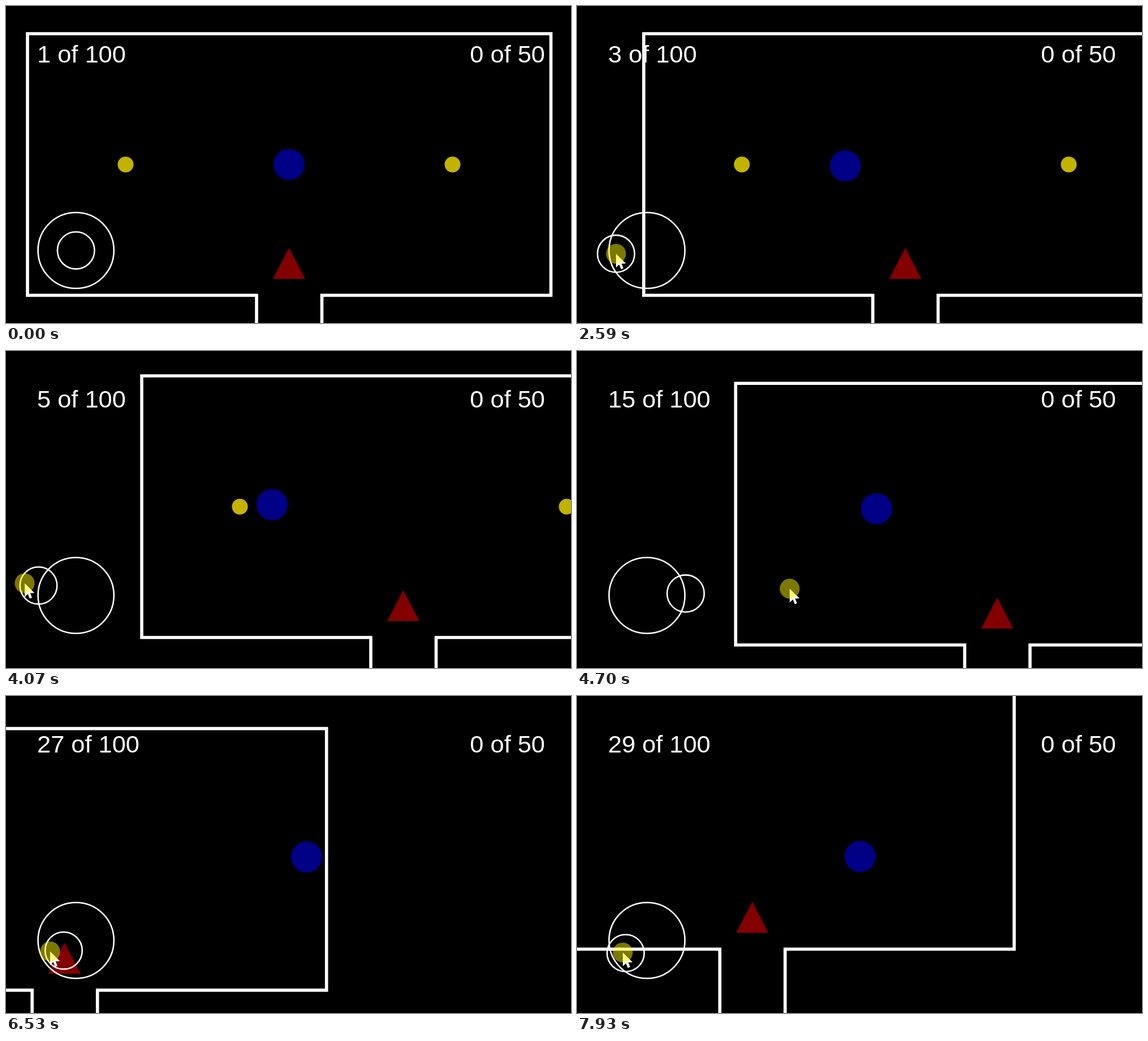
Animation, 999 px wide and 561 px high, one loop 8000 ms. Source, as an HTML page with a canvas:

```html
<!DOCTYPE html>
<html lang="en">
<head>
<meta charset="utf-8">
<title>Coin room</title>
<style>
html, body { margin: 0; width: 100%; height: 100%; overflow: hidden; background: #000; }
canvas { display: block; }
</style>
</head>
<body>
<canvas id="stage" width="999" height="561"></canvas>
<script>
const ctx = document.getElementById('stage').getContext('2d');
const LOOP = 8000, STEP = 70, LAST = 7910;
const FOLLOW = 9.2;              // camera catch-up rate per second
const KNOB_LAG = 35, REACH = 68.5;
const CENTER = [500.5, 280.5], PAD = [123.7, 432.6];
const COINS = [{ x: 211.5, taken: 4130 }, { x: 789.5, taken: 6000 }];
const ENTER = 280, PRESS = 1610;

// Turning points: time, scroll x, scroll y, player lead x, player lead y
const camera = [
  [2100, 0, 0, 0, 0], [2590, 80, 0, -26, 2.5], [3450, 100, -26, 0, 0],
  [4060, 202, -5, -30, -8.5], [4400, 285, 4, 0, -2], [5320, 14, 15, 37, -1.5],
  [6510, -396.8, 8.6, 31, 4.5], [6700, -425, 0, 0, 5], [7700, -182, -57, 0, 5],
  [LAST, -190.5, -64, 0, 3.5]
];

// Strokes of the pointer: time, x, y
const pointer = [
  [ENTER, 400, 9], [1050, 136, 412], [1190, 126, 427], [PRESS, 126, 427],
  [2380, 69, 438], [2590, 69, 438.5], [3100, 145, 480], [3700, 105, 406],
  [4060, 33, 411], [4400, 250, 420], [5320, 650, 422], [5800, 564, 424],
  [6510, 78, 452], [6800, 50, 462], [7560, 131, 464], [LAST, 81, 454]
];

function span(keys, t) {
  let i = 0;
  while (i < keys.length - 2 && t >= keys[i + 1][0]) i++;
  const a = keys[i], b = keys[i + 1], h = b[0] - a[0];
  return { a, b, h: h / 1000, u: Math.min(1, Math.max(0, (t - a[0]) / h)) };
}

function pointerAt(t) {
  const { a, b, u } = span(pointer, t);
  return [1, 2].map(i => a[i] + (b[i] - a[i]) * u);
}

// Hermite scroll; the player's lead is the scroll speed over FOLLOW.
function cameraAt(t) {
  const { a, b, h, u } = span(camera, t);
  return [1, 2].map(i => {
    const p = a[i], d = b[i] - p;
    const m = -FOLLOW * h * a[i + 2], n = -FOLLOW * h * b[i + 2];
    const c2 = 3 * d - 2 * m - n, c3 = m + n - 2 * d;
    return {
      pos: p + u * (m + u * (c2 + u * c3)),
      lead: -(m + u * (2 * c2 + 3 * u * c3)) / (h * FOLLOW)
    };
  });
}

function knobAt(t) {
  if (t <= PRESS) return PAD;
  const [x, y] = pointerAt(t - KNOB_LAG);
  const dx = x - PAD[0], dy = y - PAD[1];
  const k = Math.min(1, REACH / (Math.hypot(dx, dy) || 1));
  return [PAD[0] + dx * k, PAD[1] + dy * k];
}

function disc(x, y, r, color) {
  ctx.fillStyle = color;
  ctx.beginPath();
  ctx.arc(x, y, r, 0, 7);
  ctx.fill();
}

function ring([x, y], r) {
  ctx.lineWidth = 2.6;
  ctx.beginPath();
  ctx.arc(x, y, r, 0, 7);
  ctx.stroke();
}

function shape(path, color) {
  ctx.fillStyle = color;
  ctx.fill(new Path2D(path));
}

function label(text, x, align) {
  ctx.textAlign = align;
  ctx.fillText(text, x, 99.5);
}

function draw(t) {
  const [cx, cy] = cameraAt(t);
  ctx.fillStyle = '#000';
  ctx.fillRect(0, 0, 999, 561);
  ctx.strokeStyle = '#fff';

  ctx.save();
  ctx.translate(cx.pos, cy.pos);
  for (const coin of COINS) if (t < coin.taken) disc(coin.x, 280.5, 14, '#c4b200');
  shape('M500.5 428L528.8 483H472.2Z', '#820000');
  ctx.lineWidth = 5.6;
  ctx.stroke(new Path2D('M443 700V512H38V49H963.5V512H558.5V700'));
  ctx.restore();

  disc(CENTER[0] + cx.lead, CENTER[1] + cy.lead, 27.5, '#000086');
  ring(PAD, 67.1);
  ring(knobAt(t), 32.8);

  const bonus = 10 * COINS.filter(c => t >= c.taken).length;
  ctx.fillStyle = '#fff';
  ctx.font = '43.4px "Liberation Sans", Arial, sans-serif';
  label(Math.floor(1.2 + t / 1000) + bonus + ' of 100', 55, 'left');
  label('0 of 50', 953, 'right');

  if (t < ENTER) return;
  ctx.save();
  ctx.translate(...pointerAt(t));
  shape('M0 0V24.3L5.5 19L9 27.3L13 25.6L9.6 17.6L17.3 17.2Z', '#fff');
  if (t >= PRESS) disc(0, 0, 17.6, 'rgba(255,245,0,.49)');
  ctx.restore();
}

function tick() {
  const t = performance.now() % LOOP;
  draw(Math.min(LAST, Math.floor(t / STEP) * STEP));
  requestAnimationFrame(tick);
}
tick();
</script>
</body>
</html>
```
